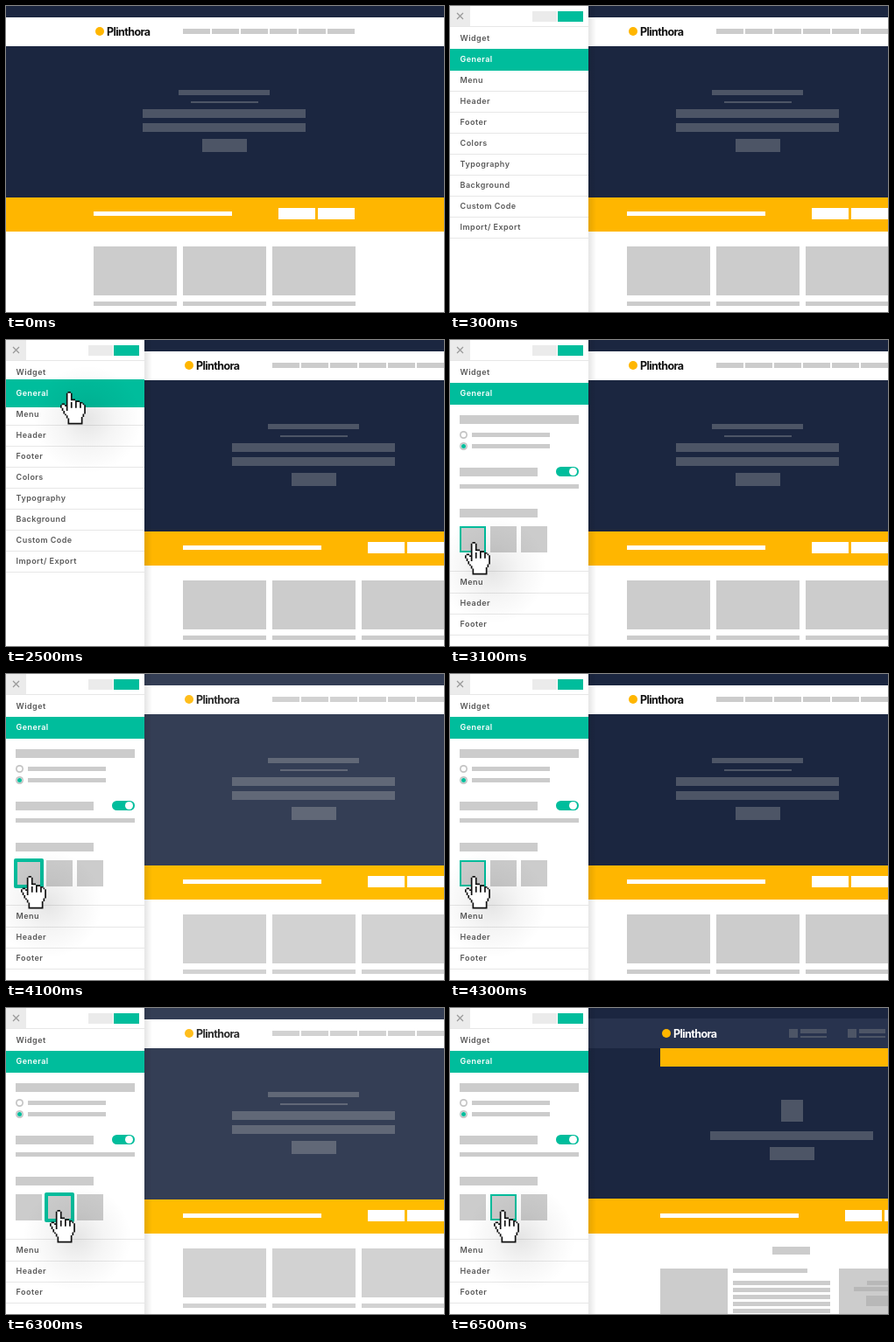
Recreate the animation shown at these times as an HTML page with a canvas. Size 500 px wide and 350 px high, loop 8000 ms.

```html
<!DOCTYPE html>
<html lang="en">
<head>
<meta charset="utf-8">
<title>Theme options panel</title>
<style>
  html, body { margin: 0; width: 100%; height: 100%; overflow: hidden; background: #fff; }
  canvas { display: block; width: 500px; height: 350px; }
</style>
</head>
<body>
<canvas id="stage" width="500" height="350"></canvas>
<script>
const ctx = document.getElementById('stage').getContext('2d');
const LOOP = 8000, STEP = 100, CLICK = 200;
const W = 500, H = 350, PANEL = 158, PAD = 11, ROW = 24, TILE = 30;
const NAVY = '#1b2640', SLATE = '#4d5566', YELLOW = '#ffb600';
const GREY = '#ccc', PALE = '#ebebeb', TEAL = '#00bd9c', INK = '#595959';
const FONT = 'Inter, "Open Sans", sans-serif';
const ITEMS = ['Widget', 'General', 'Menu', 'Header', 'Footer', 'Colors',
  'Typography', 'Background', 'Custom Code', 'Import/ Export'];

// Moments of the story
const OPEN = 200, ENTER = 1300, CLICK_ROW = 2500, EXPAND = CLICK_ROW + CLICK;
const TO_TILE = 2900, CLICK_FIRST = 4100, NEXT_TILE = 5800;
const CLICK_SECOND = 6300, SWAP = CLICK_SECOND + CLICK;

function box(color, x, y, w, h) {
  ctx.fillStyle = color;
  ctx.fillRect(x, y, w, h);
}

function centred(color, mid, y, w, h) {
  box(color, Math.round(mid - w / 2), y, w, h);
}

function band(color, y, h) {
  box(color, -W, y, 3 * W, h);
}

function disc(color, x, y, r) {
  ctx.fillStyle = color;
  ctx.beginPath();
  ctx.arc(x, y, r, 0, Math.PI * 2);
  ctx.fill();
}

function rounded(color, x, y, w, h, r) {
  ctx.fillStyle = color;
  ctx.beginPath();
  ctx.roundRect(x, y, w, h, r);
  ctx.fill();
}

function label(text, x, y, color, font, spacing) {
  ctx.font = font + ' ' + FONT;
  ctx.letterSpacing = spacing;
  ctx.fillStyle = color;
  ctx.fillText(text, x, y);
}

function at(x, y, paint) {
  ctx.save();
  ctx.translate(x, y);
  paint();
  ctx.restore();
}

// Page parts share one column whose left edge is x = 0
function logo(color) {
  disc(YELLOW, 7, 29, 5);
  label('Plinthora', 15, 33.5, color, '700 12.5px', '-0.6px');
}

function callToAction(color, y) {
  band(color, y, 258 - y);
  box('#fff', 0, 235, 158, 5);
  for (let i = 0; i < 2; i++) box('#fff', 211 + 45 * i, 231, 42, 13);
}

function firstLayout(pressed) {
  const mid = 149.3;
  band(NAVY, 0, 13);
  logo('#111');
  for (let i = 0; i < 6; i++) box(GREY, 102 + 33 * i, 26, 31, 6);
  band(NAVY, 46, 173);
  centred(SLATE, mid, 96, 104, 6);
  centred(SLATE, mid, 109, 77, 2);
  for (let i = 0; i < 2; i++) centred(SLATE, mid, 118 + 16 * i, 186, 10);
  centred(SLATE, mid, 152, 51, 15);
  for (let x = 0; x < 300; x += 102) {
    box(GREY, x, 275, 95, 56);
    box(GREY, x, 338, 95, 5);
  }
  if (pressed) band('rgba(255,255,255,.11)', 0, H);
  callToAction(pressed ? '#ffbc00' : YELLOW, 219);
}

function secondLayout() {
  const mid = 150.3;
  band(NAVY, 0, 218);
  band('#28334e', 12, 34);
  logo('#fff');
  for (let i = 0; i < 2; i++) {
    const x = 147 + 67 * i;
    box(SLATE, x, 24, 10, 10);
    box(SLATE, x + 13, 24, 30, 5);
    box(SLATE, x + 13, 32, 30, 2);
  }
  box(YELLOW, 0, 46, W, 21);
  centred(SLATE, mid, 105, 25, 25);
  centred(SLATE, mid, 141, 186, 10);
  centred(SLATE, mid, 159, 51, 15);
  callToAction(YELLOW, 218);

  centred(GREY, mid - 1, 273, 43, 9);
  box(GREY, 0, 298, 77, 52);
  box(GREY, 83, 298, 85, 5);
  for (let y = 312; y < H; y += 8) box(GREY, 83, y, 111, 5);
  box(GREY, 204, 298, W, 52);
  box('#b8b8b8', 236, 312, W, 5);
  box('#b8b8b8', 221, 319, W, 5);
  box('#b8b8b8', 235, 329, W, 12);
}

function item(i, y) {
  label(ITEMS[i], 11.6, y + 3.3, i === 1 ? '#fff' : INK, '600 9px', '0.45px');
}

function rule(y) {
  box('#e7e7e7', 0, Math.round(y), PANEL, 1);
}

function radio(y, on) {
  disc('#c4c4c4', PAD + 4.5, y, 4.5);
  disc('#fff', PAD + 4.5, y, 2.8);
  if (on) disc(TEAL, PAD + 4.5, y, 2.5);
  box(GREY, 25, y - 2.5, 89, 5);
}

function toggle(y) {
  rounded(TEAL, 121, y, 26, 11, 5.5);
  disc('#fff', 140.5, y + 5.5, 4.5);
}

function tile(x, y, selected, pressed) {
  if (selected) {
    const out = pressed ? 2 : 0;
    rounded(TEAL, x - out, y - out, TILE + 2 * out, TILE + 2 * out, out);
  }
  const inset = selected ? 2 : 0;
  box(GREY, x + inset, y + inset, TILE - 2 * inset, TILE - 2 * inset);
}

function settings(selected, pressed) {
  const wide = PANEL - 2 * PAD, short = 89;
  box(GREY, PAD, 86, wide, 10);
  radio(108.5, false);
  radio(121.5, true);
  box(GREY, PAD, 146, short, 10);
  toggle(145);
  box(GREY, PAD, 165, wide, 5);
  box(GREY, PAD, 193, short, 10);
  for (let i = 0; i < 3; i++) tile(PAD + 35 * i, 213, i === selected, pressed);
  for (let i = 0; i < 4; i++) {
    rule(264.3 + 24.3 * i);
    if (i < 3) item(i + 2, 277 + ROW * i);
  }
}

function panelHeader() {
  box(PALE, 0, 0, 23, 23);
  rule(23);
  ctx.strokeStyle = '#999';
  ctx.lineWidth = 1.2;
  ctx.stroke(new Path2D('M8 8l7 7M15 8l-7 7'));
  box(PALE, 94, 6, 28, 12);
  box(TEAL, 123, 6, 29, 12);
}

function panel(t) {
  const edge = ctx.createLinearGradient(PANEL, 0, PANEL + 9, 0);
  edge.addColorStop(0, 'rgba(0,0,0,.1)');
  edge.addColorStop(1, 'rgba(0,0,0,0)');
  box(edge, PANEL, 0, 9, H);
  box('#fff', 0, 0, PANEL, H);
  panelHeader();
  item(0, 37);
  if (t >= EXPAND) {
    settings(t < NEXT_TILE ? 0 : 1, tilePressed(t));
  } else {
    for (let i = 2; i < ITEMS.length; i++) {
      item(i, 37 + ROW * i);
      rule(49 + ROW * i);
    }
  }
  const grow = clicking(t, CLICK_ROW) ? 4 : 0;
  box(TEAL, 0, 49 - grow, PANEL, 25 + 1.75 * grow);
  item(1, 61);
}

// Hand pointer: key points joined by blocky pixel lines
const OUTLINE = ('4,10 4,1 5,0 6,0 7,1 7,5 9,5 10,6 12,6 13,7 14,7 16,9 16,13 14,17 ' +
  '14,21 5,21 5,18 3,15 0,10 0,9 1,8 2,8 4,10').split(' ').map(p => p.split(',').map(Number));

function pixelLine(path, [x0, y0], [x1, y1]) {
  const n = Math.max(Math.abs(x1 - x0), Math.abs(y1 - y0));
  for (let i = 0; i <= n; i++) {
    path.rect(Math.round(x0 + (x1 - x0) * i / n), Math.round(y0 + (y1 - y0) * i / n), 1, 1);
  }
}

const handFill = new Path2D(), handLines = new Path2D();
OUTLINE.forEach((p, i) => {
  handFill.lineTo(p[0] + .5, p[1] + .5);
  if (i) pixelLine(handLines, OUTLINE[i - 1], p);
});
pixelLine(handLines, [4, 10], [4, 12]);
for (let x = 7; x <= 13; x += 3) pixelLine(handLines, [x, 7], [x, 10]);

function pointer(x, y) {
  const r = 62;
  at(x, y, () => {
    const shade = ctx.createRadialGradient(31, 32, 0, 31, 32, r);
    shade.addColorStop(0, 'rgba(0,0,0,.1)');
    shade.addColorStop(.5, 'rgba(0,0,0,.04)');
    shade.addColorStop(1, 'rgba(0,0,0,0)');
    box(shade, 31 - r, 32 - r, 2 * r, 2 * r);
    ctx.scale(1.7, 1.7);
    ctx.fillStyle = '#fff';
    ctx.fill(handFill);
    ctx.fillStyle = '#111';
    ctx.fill(handLines);
  });
}

// Each stop: time, x, y
const STOPS = [
  [ENTER, 423, 269], [ENTER + STEP, 243, 164], [ENTER + 2 * STEP, 62, 59],
  [TO_TILE, 41, 121], [TO_TILE + 2 * STEP, 17, 231], [NEXT_TILE, 50, 231]
];

function clicking(t, from) {
  return t >= from && t < from + CLICK;
}

function tilePressed(t) {
  return clicking(t, CLICK_FIRST) || clicking(t, CLICK_SECOND);
}

function draw(t) {
  const open = t < OPEN ? 0 : t < OPEN + STEP ? .5 : 1;
  box('#fff', 0, 0, W, H);
  if (t < SWAP) at(100 + 102 * open, 0, () => firstLayout(tilePressed(t)));
  else at(240, 0, secondLayout);
  if (open) at(PANEL * (open - 1), 0, () => panel(t));
  const stop = STOPS.findLast(s => t >= s[0]);
  if (stop) pointer(stop[1], stop[2]);
}

const start = performance.now();
function tick() {
  draw((performance.now() - start) % LOOP);
  requestAnimationFrame(tick);
}
tick();
</script>
</body>
</html>
```
